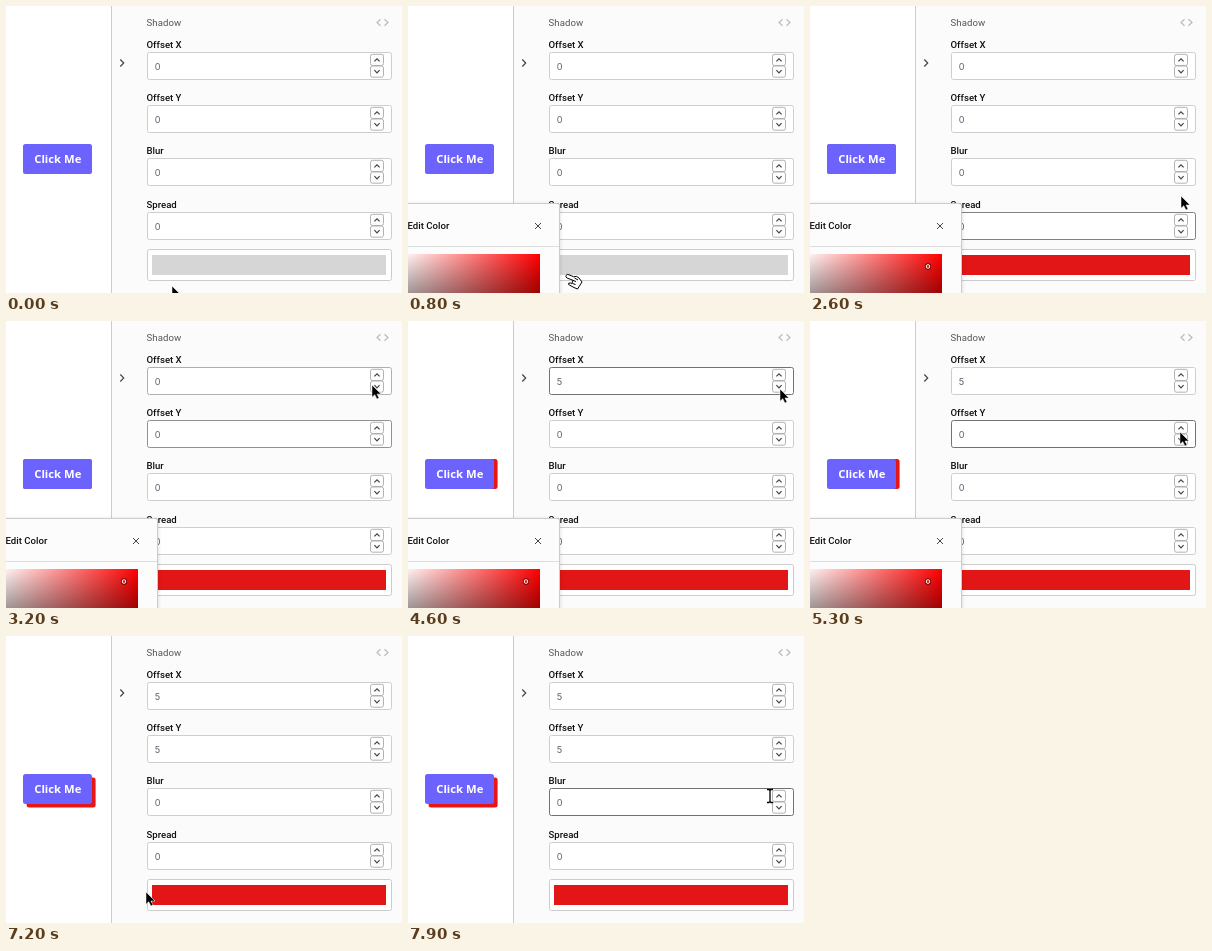
Animation, 396 px wide and 287 px high, one loop 8000 ms. Source, as an HTML page:

```html
<!DOCTYPE html>
<html lang="en">
<head>
<meta charset="utf-8">
<title>Shadow settings</title>
<style>
  html, body { margin: 0; width: 100%; height: 100%; overflow: hidden; background: #fff; }
  svg { display: block; width: 396px; height: 287px; }
  text { font: 9.6px Roboto, sans-serif; fill: #111; }
  .title { fill: #555; letter-spacing: .1px; }
  .label { font-weight: 500; }
  .value { font: 9.2px Inter, sans-serif; fill: #56616f; }
  .button { font: bold 11.3px "Open Sans", sans-serif; fill: #fff; }
  .line { fill: none; stroke: #444; stroke-width: 1.2; }
  .box { fill: #fff; stroke: #ccc; }
  .spin { fill: #fdfdfd; stroke: #aaa; stroke-width: .9; }
</style>
</head>
<body>
<svg viewBox="0 0 396 287">
  <defs>
    <linearGradient id="hue"><stop stop-color="#fff"/><stop offset="1" stop-color="#f00"/></linearGradient>
    <linearGradient id="dark" x2="0" y2="1"><stop stop-opacity="0"/><stop offset="1"/></linearGradient>
    <filter id="soft" x="-10%" y="-10%" width="120%" height="120%"><feGaussianBlur stdDeviation="2"/></filter>
  </defs>

  <rect width="396" height="287" fill="#fff"/>
  <rect x="105" width="291" height="287" fill="#fbfbfb"/>
  <path d="M105.5 0V287" stroke="#ccc"/>
  <path class="line" d="M114.3 53.5L117.7 57L114.3 60.5"/>
  <path class="line" style="stroke:#bbb" d="M374.5 13.2L371 16.5L374.5 19.8M378.5 13.2L382 16.5L378.5 19.8"/>
  <text class="title" x="140.5" y="20">Shadow</text>

  <rect id="shade" x="17" y="138" width="69" height="30" rx="2.5"/>
  <rect x="17" y="138" width="69" height="30" rx="2.5" fill="#6c63ff"/>
  <text class="button" x="28.2" y="157">Click Me</text>

  <g id="fields"></g>
  <rect class="box" x="141.5" y="243.5" width="244" height="31" rx="2"/>
  <rect id="swatch" x="146" y="249" width="234" height="20"/>

  <g id="popup">
    <rect x="-20" y="198" width="172" height="110" opacity=".15" filter="url(#soft)"/>
    <rect x="-20" y="197.5" width="171.5" height="110" rx="2" fill="#fcfcfc" stroke="#ccc"/>
    <path d="M0 240.5H151" stroke="#ddd"/>
    <text class="label" x="-.5" y="223">Edit Color</text>
    <path class="line" style="stroke-width:1" d="M127 217L133 223M133 217L127 223"/>
    <rect x="-8" y="248" width="140" height="105" fill="url(#hue)"/>
    <rect x="-8" y="248" width="140" height="105" fill="url(#dark)"/>
    <g id="marker" fill="none">
      <rect x="115.5" y="258" width="5" height="5" rx="1.5" stroke="#400"/>
      <rect x="116.3" y="258.8" width="3.4" height="3.4" rx="1" stroke="#fff"/>
    </g>
  </g>

  <g id="arrow">
    <path d="M0 0V12.2L2.8 9.7L4.9 14L7 13L5 9H9Z" fill="#000" stroke="#fff" stroke-width=".5"/>
  </g>
  <g id="hand" stroke="#000" stroke-width="1" stroke-linejoin="round">
    <path fill="#fff" d="M1 1.5Q2-.3 4 .8L8.5 2.7Q12 1.5 14 4L17 8L12.5 15L9 13.5L3.5 10.5Q3 8.5 5.5 9L7 9.5L8 6.3L2 4Q.3 3 1 1.5Z"/>
    <path fill="none" d="M8 6.3L11 7.6M9.5 4L13 6M7.5 9.5L10.5 10.5"/>
  </g>
  <g id="beam">
    <path d="M-3-6.5H-1L0-5.5L1-6.5H3M0-5.5V5.5M-3 6.5H-1L0 5.5L1 6.5H3" fill="none" stroke="#000" stroke-width="1.3"/>
  </g>
</svg>
<script>
const $ = id => document.getElementById(id);
const LOOP = 8000, STEP = 100, PX = 0.72;
const CLICKS = { x: [3700, 3900, 4100, 4200, 4400], y: [5500, 5700, 5800, 6000, 6200] };

// Hover spans: [start, end] for each field
const FIELDS = [
  { name: "Offset X", top: 46, hover: [[3100, 4800]] },
  { name: "Offset Y", top: 99, hover: [[2800, 3100], [5000, 6350]] },
  { name: "Blur", top: 152, hover: [[2600, 2750], [7400, 9000]] },
  { name: "Spread", top: 206, hover: [[2100, 2550]] }
];

// Pointer: runs of consecutive steps, each holding its last pose
const PATHS = [
  [0, "arrow", [166, 280], [167, 276], [168, 271]],
  [300, "hand", [165, 258], [165, 251]],
  [800, "hand", [157, 268]],
  [900, ""],
  [1100, "hand", [121, 280], [119, 267], [116, 259]],
  [1900, "hand", [134, 256], [195, 247]],
  [2100, "beam", [262, 232], [318, 216]],
  [2300, "arrow", [365, 193], [370, 208]],
  [2600, "arrow", [371, 190], [370, 168], [369, 148], [368, 125], [367, 106], [366, 84], [366, 64], [368, 58], [370, 53]],
  [4600, "arrow", [372, 68], [373, 72], [374, 79], [374, 88], [373, 97], [372, 104], [371, 109], [370, 111], [370, 106]],
  [6200, "arrow", [366, 116], [300, 162], [185, 222]],
  [6500, "hand", [82, 252], [62, 276]],
  [6700, ""],
  [7000, "arrow", [80, 282], [105, 272], [140, 256], [190, 232], [240, 205], [285, 185]],
  [7600, "beam", [318, 168], [338, 161], [350, 160], [362, 160]]
];

$("fields").innerHTML = FIELDS.map(({ name, top }) => `
  <text class="label" x="140.5" y="${top - 4.3}">${name}</text>
  <g transform="translate(0 ${top})">
    <rect class="box field" x="141.5" y=".5" width="244" height="27" rx="2"/>
    <text class="value" x="148.7" y="17.7">0</text>
    <rect class="spin" x="364.5" y="2.3" width="13" height="11.2" rx="2"/>
    <rect class="spin" x="364.5" y="14" width="13" height="11.2" rx="2"/>
    <path class="line" d="M368.4 9.4L371 6.8L373.6 9.4M368.4 18.2L371 20.8L373.6 18.2"/>
  </g>`).join("");
const borders = document.querySelectorAll(".field");
const values = document.querySelectorAll(".value");

const clamp = v => Math.max(0, Math.min(1, v));
const count = (times, t) => times.filter(s => s <= t).length;
const show = (id, on) => $(id).setAttribute("visibility", on ? "inherit" : "hidden");

function drawPointer(t) {
  const [start, kind, ...points] = PATHS.filter(p => p[0] <= t).pop();
  for (const id of ["arrow", "hand", "beam"]) show(id, id === kind);
  if (!kind) return;
  const pos = points[Math.min(points.length - 1, Math.floor((t - start) / STEP))];
  $(kind).setAttribute("transform", `translate(${pos})`);
}

function draw(t) {
  const x = count(CLICKS.x, t), y = count(CLICKS.y, t);
  const picked = t >= 1500;
  values[0].textContent = x;
  values[1].textContent = y;
  $("shade").setAttribute("transform", `translate(${x * PX} ${y * PX})`);
  $("shade").setAttribute("fill", picked ? "#e61616" : "#d8d8d8");
  $("swatch").setAttribute("fill", picked ? "#e21616" : "#d6d6d6");
  show("popup", t >= 600 && t < 6900);
  show("marker", picked);
  FIELDS.forEach(({ hover }, i) => {
    const level = Math.max(...hover.map(([a, b]) =>
      Math.min(clamp((t - a) / 300), 1 - clamp((t - b) / 300))));
    const grey = Math.round(206 - 92 * level);
    borders[i].style.stroke = `rgb(${grey},${grey},${grey})`;
  });
  drawPointer(t);
}

const origin = performance.now();
function tick() {
  const t = (performance.now() - origin) % LOOP;
  draw(Math.floor(t / STEP) * STEP);
  requestAnimationFrame(tick);
}
tick();
</script>
</body>
</html>
```
